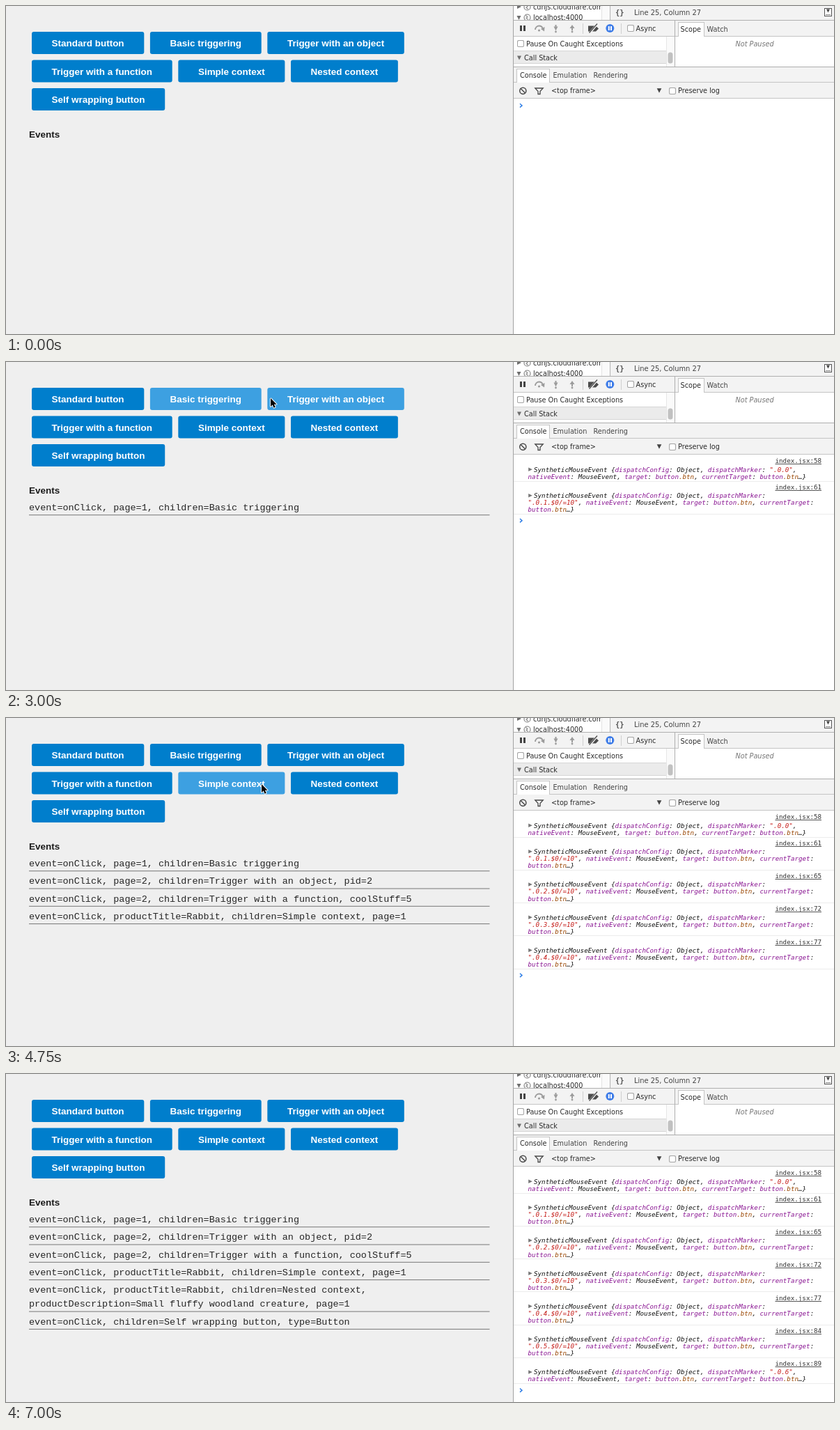
These frames come from a looping animation (1189 px wide and 471 px high, 7.25 s). An HTML page with a canvas:

```html
<!DOCTYPE html>
<html lang="en">
<head>
<meta charset="utf-8">
<title>Button events demo</title>
<style>
html, body { margin: 0; width: 100%; height: 100%; overflow: hidden; background: #efefef; }
canvas { display: block; }
</style>
</head>
<body>
<canvas id="stage" width="1189" height="471"></canvas>
<script>
const ctx = document.getElementById('stage').getContext('2d');
const LOOP = 7250, STEP = 250, BLUR_AT = 7000;
const UI = '9.7px "DejaVu Sans", sans-serif';
const MONO = '9.22px "DejaVu Sans Mono", monospace';
const BOLD = 'bold 13.47px "Liberation Sans", Arial, sans-serif';
const EVENT = '13.47px "Liberation Mono", "Courier New", monospace';

// down and up are the times of the mouse press and release
const buttons = [
  { label: 'Standard button', row: 58, down: 2250, up: 2250 },
  { label: 'Basic triggering', row: 61, down: 2750, up: 3000, data: 'page=1, children=@' },
  { label: 'Trigger with an object', row: 65, down: 3250, up: 3500, data: 'page=2, children=@, pid=2' },
  { label: 'Trigger with a function', row: 72, down: 4000, up: 4250, data: 'page=2, children=@, coolStuff=5' },
  { label: 'Simple context', row: 77, down: 4750, up: 4750, data: 'productTitle=Rabbit, children=@, page=1' },
  { label: 'Nested context', row: 84, down: 5250, up: 5250,
    data: 'productTitle=Rabbit, children=@, productDescription=Small fluffy woodland creature, page=1' },
  { label: 'Self wrapping button', row: 89, down: 6000, up: 6000, data: 'children=@, type=Button' }
];

// pointer path: time, x, y
const path = [
  [750, 168, 30], [1000, 149, 47], [2000, 150, 46], [2250, 163, 47], [2750, 290, 50],
  [3000, 380, 52], [3500, 386, 57], [3750, 207, 95], [4000, 204, 94], [4250, 262, 96],
  [4500, 291, 98], [4750, 367, 95], [5250, 472, 91], [5500, 287, 136], [5750, 190, 142],
  [6000, 297, 122]
];

function rect(x, y, w, h, color) {
  ctx.fillStyle = color;
  ctx.fillRect(x, y, w, h);
}

function round(x, y, w, h, r, color) {
  ctx.fillStyle = color;
  ctx.beginPath();
  ctx.roundRect(x, y, w, h, r);
  ctx.fill();
}

function text(str, x, y, font = UI, color = '#2a2a2a') {
  ctx.font = font;
  ctx.fillStyle = color;
  ctx.fillText(str, x, y);
}

function poly(points, color) {
  ctx.fillStyle = color;
  ctx.beginPath();
  points.forEach(([x, y]) => ctx.lineTo(x, y));
  ctx.closePath();
  ctx.fill();
}

function line(points, color, width = 1) {
  ctx.strokeStyle = color;
  ctx.lineWidth = width;
  ctx.beginPath();
  points.forEach(([x, y]) => ctx.lineTo(x, y));
  ctx.stroke();
}

function circle(x, y, r, color, width) {
  ctx.beginPath();
  ctx.arc(x, y, r, 0, Math.PI * 2);
  ctx.lineWidth = width || 1;
  ctx.fillStyle = ctx.strokeStyle = color;
  width ? ctx.stroke() : ctx.fill();
}

function box(x, y, w, h, color, fill = '#fff') {
  rect(x, y, w, h, color);
  rect(x + 1, y + 1, w - 2, h - 2, fill);
}

const right = (x, y, color, s = 3) => poly([[x - s, y - s], [x + s, y], [x - s, y + s]], color);
const down = (x, y, color, s = 3) => poly([[x - s, y - s], [x + s, y - s], [x, y + s]], color);

function checkbox(x, y) {
  round(x, y, 10, 10, 2, '#a4a4a4');
  round(x + 1, y + 1, 8, 8, 1.5, '#fff');
}

function wrap(str, limit) {
  const lines = [];
  for (const word of str.split(' ')) {
    const last = lines.at(-1);
    if (last && last.length + 1 + word.length <= limit) lines[lines.length - 1] += ' ' + word;
    else lines.push(word);
  }
  return lines;
}

// Buttons flow like inline blocks
function layout() {
  let x = 37, y = 37;
  ctx.font = BOLD;
  for (const b of buttons) {
    b.w = ctx.measureText(b.label).width + 57.3;
    if (x + b.w > 694) {
      x = 37;
      y += 40.5;
    }
    Object.assign(b, { x, y });
    x += b.w + 8.6;
  }
}

function pointerAt(t) {
  const i = path.findLastIndex(p => p[0] <= t);
  if (i < 0 || t > path.at(-1)[0]) return null;
  const [t0, x0, y0] = path[i];
  const [t1, x1, y1] = path[i + 1] || [t0 + 1, x0, y0];
  const k = (t - t0) / (t1 - t0);
  return [x0 + (x1 - x0) * k, y0 + (y1 - y0) * k];
}

function hit(b, p) {
  return p && p[0] >= b.x && p[0] <= b.x + b.w && p[1] >= b.y && p[1] <= b.y + 32;
}

function drawButtons(t, pointer) {
  const active = t >= buttons[0].down;
  const focus = t < BLUR_AT && buttons.findLast(b => b.down <= t);
  for (const b of buttons) {
    const pressed = t >= b.down && t < b.up;
    const lit = b === focus || active && hit(b, pointer);
    round(b.x, b.y, b.w, 32, 3, pressed ? '#0070b4' : lit ? '#3da0e1' : '#007ecc');
    text(b.label, b.x + 28.6, b.y + 21, BOLD, '#fff');
  }
}

function drawEvents(clicked) {
  text('Events', 33, 188.6, BOLD, '#1c1c1c');
  let y = 213;
  for (const b of clicked.filter(b => b.data)) {
    const lines = wrap('event=onClick, ' + b.data.replace('@', b.label), 81);
    lines.forEach((str, i) => text(str, 33, y + i * 20.2, EVENT, '#262626'));
    y += (lines.length - 1) * 20.2;
    rect(33, y + 6.2, 661.5, 1, '#777');
    y += 25.3;
  }
}

function drawSources() {
  rect(729, 0, 460, 20, '#f3f3f3');
  ctx.save();
  ctx.beginPath();
  ctx.rect(729, 0, 126, 20);
  ctx.clip();
  rect(729, 0, 126, 20, '#fff');
  right(737, 1, '#6e6e6e');
  down(736.5, 17, '#6e6e6e');
  for (const y of [1.5, 16.5]) {
    circle(748.5, y, 4.5, '#7d7d7d', 1.1);
    line([[746, y - 3], [749, y - 1], [747, y + 1], [750, y + 3]], '#8d8d8d', 1.2);
  }
  text('cdnjs.cloudflare.com', 757, 4.5);
  text('localhost:4000', 757, 20);
  ctx.restore();
  rect(855, 0, 12, 20, '#fafafa');
  rect(855, 0, 1, 20, '#e2e2e2');
  rect(867, 0, 1, 20, '#b5b5b5');
  text('{}', 875, 13, 'bold 10.5px "DejaVu Sans Mono", monospace', '#555');
  text('Line 25, Column 27', 902, 13, '9.87px "DejaVu Sans", sans-serif', '#444');
  box(1175, 3, 11, 12, '#555');
  down(1180.5, 7, '#444', 2.5);
  rect(1177, 12, 7, 1, '#888');
  rect(729, 20, 460, 1, '#b0b0b0');
}

function drawDebugger() {
  rect(729, 21, 460, 22, '#f3f3f3');
  rect(729, 43, 460, 44, '#fff');
  rect(729, 43, 460, 1, '#c4c4c4');
  rect(738, 28, 3, 8, '#444');
  rect(743, 28, 3, 8, '#444');

  const gray = '#9c9c9c';
  ctx.strokeStyle = gray;
  ctx.lineWidth = 1.8;
  ctx.beginPath();
  ctx.arc(765.5, 34, 5.5, Math.PI, -0.35);
  ctx.stroke();
  poly([[768, 33], [773.5, 30], [773, 36.5]], gray);
  circle(765.5, 35, 1.6, gray);

  rect(788.5, 27, 2, 5, gray);
  down(789.5, 32.5, gray);
  circle(789.5, 37, 1.4, gray);
  poly([[809.5, 32], [813, 27], [816.5, 32]], gray);
  rect(812, 31, 2, 4, gray);
  circle(813, 37, 1.4, gray);

  rect(828, 25, 1, 15, '#cfcfcf');
  poly([[836, 28.5], [847, 28.5], [851, 32.5], [847, 36.5], [836, 36.5]], '#4c4c4c');
  line([[838, 39], [849, 26]], '#f3f3f3', 3);
  line([[837.5, 38.5], [849, 25.5]], '#4c4c4c', 1.3);
  circle(867.3, 32, 6, '#3f7de8');
  rect(864.8, 29, 2, 6, '#fff');
  rect(868, 29, 2, 6, '#fff');
  rect(883, 25, 1, 15, '#cfcfcf');
  checkbox(892, 27);
  text('Async', 904.5, 36);

  checkbox(734, 49);
  text('Pause On Caught Exceptions', 747, 58);
  rect(729, 65, 219, 17, '#ebebeb');
  rect(729, 64, 219, 1, '#d6d6d6');
  rect(729, 82, 219, 1, '#d6d6d6');
  down(737, 74.5, '#6e6e6e');
  text('Call Stack', 744, 78);
  rect(948, 44, 12, 43, '#fafafa');
  rect(948, 44, 1, 43, '#e6e6e6');
  round(950.5, 66.5, 7, 16, 3.5, '#c1c1c1');
  rect(960, 21, 1, 66, '#b0b0b0');

  box(965, 23, 38, 21, '#c4c4c4');
  rect(966, 43, 36, 1, '#fff');
  text('Scope', 968.5, 37);
  text('Watch', 1006.5, 37, UI, '#444');
  text('Not Paused', 1047.5, 58, 'italic ' + UI, '#777');
  rect(729, 87, 460, 1, '#adadad');
}

function drawConsoleBar() {
  rect(729, 88, 460, 44, '#f3f3f3');
  rect(729, 109, 460, 1, '#c4c4c4');
  box(733, 90, 48, 20, '#c4c4c4');
  rect(734, 109, 46, 1, '#fff');
  text('Console', 738, 103);
  text('Emulation', 785.5, 103, UI, '#444');
  text('Rendering', 843.5, 103, UI, '#444');

  circle(742.3, 121.8, 4.6, '#4a4a4a', 1.5);
  line([[739, 118.5], [745.6, 125]], '#4a4a4a', 1.5);
  ctx.lineJoin = 'miter';
  line([[759.8, 118], [771.2, 118], [767, 122.5], [767, 126.5], [764, 126.5], [764, 122.5], [759.8, 118], [761, 118]], '#4a4a4a', 1.3);
  text('<top frame>', 783, 125);
  down(938, 121.5, '#444', 3.3);
  checkbox(952, 117);
  text('Preserve log', 965, 125);
  rect(729, 132, 460, 1, '#c4c4c4');
}

function tokenColor(token, next) {
  if (token[0] === '"') return '#c41a16';
  if (token === '.btn') return '#994500';
  if (token === 'button' || next === ':') return '#881391';
  return '#111';
}

function logLine(str, x, y) {
  for (const m of str.matchAll(/"[^"]*"|\.btn|\w+|[^\w".]+/g)) {
    text(m[0], x, y, 'italic ' + MONO, tokenColor(m[0], str[m.index + m[0].length]));
    x += ctx.measureText(m[0]).width;
  }
}

// Only the buttons inside a wrapper carry a child key
function logLines(i) {
  const id = `.0.${i}` + (i > 0 && i < buttons.length - 1 ? '.$0/=10' : '');
  return wrap(`SyntheticMouseEvent {dispatchConfig: Object, dispatchMarker: "${id}", ` +
    'nativeEvent: MouseEvent, target: button.btn, currentTarget: button.btn…}', 74);
}

function drawConsole(clicked) {
  rect(729, 133, 460, 338, '#fff');
  let top = 133.2;
  clicked.forEach((b, i) => {
    const lines = logLines(i);
    text('index.jsx:' + b.row, 1104.5, top + 12.2, MONO, '#333');
    rect(1104.5, Math.round(top + 13.2), 66.5, 1, '#555');
    right(753, top + 21, '#777', 2.8);
    lines.forEach((str, n) => logLine(str, n ? 749.5 : 758, top + 24.3 + n * 10.2));
    top += 18 + lines.length * 9.75;
    rect(729, Math.round(top), 460, 1, '#ececec');
  });
  const y = top + 9.7;
  line([[738, y - 2.7], [741, y], [738, y + 2.7]], '#2f7ee6', 1.5);
}

function drawPointer([x, y]) {
  const arrow = [[0, 0], [0, 12], [2.8, 9.5], [4.6, 13.7], [6.7, 12.8], [4.9, 8.7], [8.6, 8.7]]
    .map(([dx, dy]) => [x + dx, y + dy]);
  ctx.lineJoin = 'round';
  line([...arrow, arrow[0]], '#fff', 1.8);
  poly(arrow, '#000');
}

function draw(time) {
  const t = Math.floor(time / STEP) * STEP;
  const pointer = pointerAt(t);
  const clicked = buttons.filter(b => b.up <= t);
  rect(0, 0, 728, 471, '#efefef');
  drawButtons(t, pointer);
  drawEvents(clicked);
  drawSources();
  drawDebugger();
  drawConsoleBar();
  drawConsole(clicked);
  rect(728, 0, 1, 471, '#a3a3a3');
  if (pointer) drawPointer(pointer);
}

layout();
const start = performance.now();
function tick() {
  draw((performance.now() - start) % LOOP);
  requestAnimationFrame(tick);
}
tick();
</script>
</body>
</html>
```
